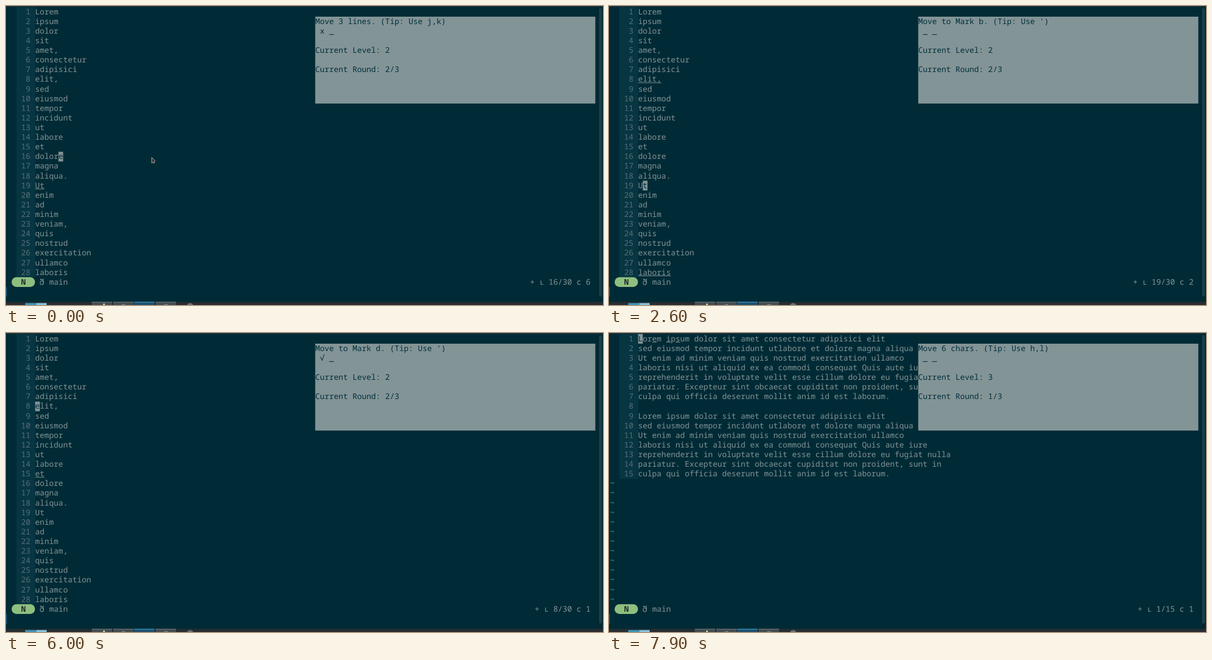
Recreate the animation shown at these times as an HTML page. Size 1057 by 530 pixels, loop 8 s.

```html
<!DOCTYPE html>
<html lang="en">
<head>
<meta charset="utf-8">
<title>Motion trainer in a terminal editor</title>
<style>
  html, body { margin: 0; width: 100%; height: 100%; overflow: hidden; background: #002b36; }
  svg { display: block; width: 1057px; height: 530px; }
  text {
    font: 13.775px "Noto Sans Mono", "DejaVu Sans Mono", monospace;
    font-variant-ligatures: none;
    text-rendering: geometricPrecision;
    white-space: pre;
    fill: #839496;
  }
  .num { fill: #586e75; }
  .tilde { fill: #74888c; }
  .dark { fill: #002f3b; }
  .mode { fill: #1c2b2a; font-weight: 700; }
  .gutter { fill: #073642; }
  .block { fill: #839496; }
</style>
</head>
<body>
<svg viewBox="0 0 1057 530">
  <rect width="1057" height="530" fill="#002b36"/>

  <!-- window edge and scrollbar -->
  <rect width="1057" height="1.3" fill="#2b353a"/>
  <rect x="1047" y="1.3" width="10" height="523" fill="#042832"/>
  <rect x="1050" y="4" width="5" height="511" rx="2.5" fill="#17404b"/>

  <!-- taskbar -->
  <rect y="524.5" width="1057" height="5.5" fill="#272d31"/>
  <g transform="translate(0 526.5)">
    <rect x="34" width="20" height="4" fill="#3f93b8"/>
    <rect x="54" width="18" height="4" fill="#85c3dc"/>
  </g>
  <g transform="translate(0 524.5)">
    <path d="M152 0h36v6h-36zM190 0h36v6h-36zM265 0h36v6h-36z" fill="#454c51"/>
    <path d="M152 0h36v1h-36zM190 0h36v1h-36zM265 0h36v1h-36z" fill="#737a7e"/>
    <rect x="227" width="36" height="6" fill="#1f506c"/>
    <rect x="227" width="36" height="1" fill="#3daee9"/>
    <rect x="172" y="3" width="3" height="3" fill="#d8d79a"/>
    <rect x="205" y="4" width="6" height="2" fill="#777e82"/>
    <rect x="280" y="4" width="7" height="2" fill="#777e82"/>
    <circle cx="326" cy="8" r="6" fill="#687075"/>
  </g>

  <g id="scene"></g>

  <!-- status line -->
  <rect x="10" y="480.8" width="41.3" height="17.1" rx="8.5" fill="#8fbf7f"/>
  <g fill="none" stroke="#839496" stroke-width="1.2">
    <ellipse cx="63.4" cy="490.7" rx="2.9" ry="3.2"/>
    <path d="M66.3 491V487.5Q66 485.5 63.5 485.5H60.5M61 483.5L63 485.5M66.8 483.5L64.8 485.5"/>
  </g>
  <text id="mode" class="mode">N</text>
  <text id="branch">main</text>
  <rect y="498" width="1.3" height="17" fill="#1d628f"/>

  <path id="pointer" d="M258 268.5V278.3L260.6 276.9L261.6 278.6L263 277.7L262.2 275.8L264 274.5Z"
        fill="#3a2a2b" stroke="#c3c8c8" stroke-width=".9" stroke-linejoin="round"/>
</svg>

<script>
const COL = 8.265, ROW = 17.11, LEFT = 2, TOP = 1.8, BASE = 12.9;
const LOOP = 8000, TEXT_COL = 6, PANEL_COL = 66;
const $ = id => document.getElementById(id);
const colX = c => LEFT + c * COL;
const rowY = r => TOP + r * ROW;

const words = ("Lorem ipsum dolor sit amet, consectetur adipisici elit, sed eiusmod tempor " +
  "incidunt ut labore et dolore magna aliqua. Ut enim ad minim veniam, quis nostrud " +
  "exercitation ullamco laboris").split(" ");
const verse = [
  "Lorem ipsum dolor sit amet consectetur adipisici elit",
  "sed eiusmod tempor incidunt utlabore et dolore magna aliqua",
  "Ut enim ad minim veniam quis nostrud exercitation ullamco",
  "laboris nisi ut aliquid ex ea commodi consequat Quis aute iure",
  "reprehenderit in voluptate velit esse cillum dolore eu fugiat nulla",
  "pariatur. Excepteur sint obcaecat cupiditat non proident, sunt in",
  "culpa qui officia deserunt mollit anim id est laborum."
];
const prose = [...verse, "", ...verse];

// cursor: [line, column]; marks: [line, column, length]
const moveLines = {
  lines: words, cursor: [16, 6], marks: [[19, 1, 2]], total: 30,
  task: "Move 3 lines. (Tip: Use j,k)", score: " x _", level: 2, round: 2
};
const markB = {
  ...moveLines, cursor: [19, 2], marks: [[8, 1, 5], [28, 1, 7]],
  task: "Move to Mark b. (Tip: Use ')", score: " _ _"
};
const markD = {
  ...moveLines, cursor: [8, 1], marks: [[15, 1, 2]],
  task: "Move to Mark d. (Tip: Use ')", score: " √ _"
};
const moveChars = {
  lines: prose, cursor: [1, 1], marks: [[1, 4, 1], [1, 7, 1], [1, 9, 1]], total: 15,
  task: "Move 6 chars. (Tip: Use h,l)", score: " _ _", level: 3, round: 1
};
const timeline = [
  { at: 0, ...moveLines, pointer: true },
  { at: 1300, ...moveLines, keys: "3" },
  { at: 2600, ...markB },
  { at: 5500, ...markB, keys: "'" },
  { at: 6000, ...markD },
  { at: 7400, ...markD, keys: "'" },
  { at: 7900, ...moveChars }
];

const text = (row, col, str, cls = "") =>
  `<text x="${colX(col)}" y="${rowY(row) + BASE}" class="${cls}">${str}</text>`;
const box = (row, col, rows, cols, cls) =>
  `<rect x="${colX(col)}" y="${rowY(row)}" width="${cols * COL}" height="${rows * ROW}" class="${cls}"/>`;
const underline = ([line, col, len]) =>
  `<rect x="${colX(TEXT_COL + col - 1)}" y="${rowY(line - 1) + 14}" width="${len * COL}" height="1" class="block"/>`;

function draw(s) {
  const [line, col] = s.cursor;
  const status = `+ ʟ ${line}/${s.total} c ${col}`;
  let out = box(0, 2, s.lines.length, 4, "gutter");

  s.lines.forEach((str, i) => {
    const num = String(i + 1);
    out += text(i, 5 - num.length, num, "num") + text(i, TEXT_COL, str);
  });
  for (let r = s.lines.length; r < 28; r++) out += text(r, 0, "~", "tilde");
  out += s.marks.map(underline).join("");

  const cursorCol = TEXT_COL + col - 1;
  out += box(line - 1, cursorCol, 1, 1, "block");
  out += text(line - 1, cursorCol, s.lines[line - 1][col - 1], "dark");

  out += box(1, PANEL_COL, 9, 60, "block");
  const panel = [s.task, s.score, "", `Current Level: ${s.level}`, "", `Current Round: ${s.round}/3`];
  panel.forEach((str, i) => { out += text(i + 1, PANEL_COL, str, "dark"); });

  out += text(28, 125 - status.length, status);
  if (s.keys) out += text(29, 115, s.keys);
  $("scene").innerHTML = out;
  $("pointer").style.display = s.pointer ? "" : "none";
}

function place(id, col) {
  $(id).setAttribute("x", colX(col));
  $(id).setAttribute("y", rowY(28) + BASE);
}
place("mode", 3);
place("branch", 9);

let shown;
const start = performance.now();
function tick() {
  const t = (performance.now() - start) % LOOP;
  const scene = timeline.findLast(s => s.at <= t);
  if (scene !== shown) draw(shown = scene);
  requestAnimationFrame(tick);
}
tick();
</script>
</body>
</html>
```
